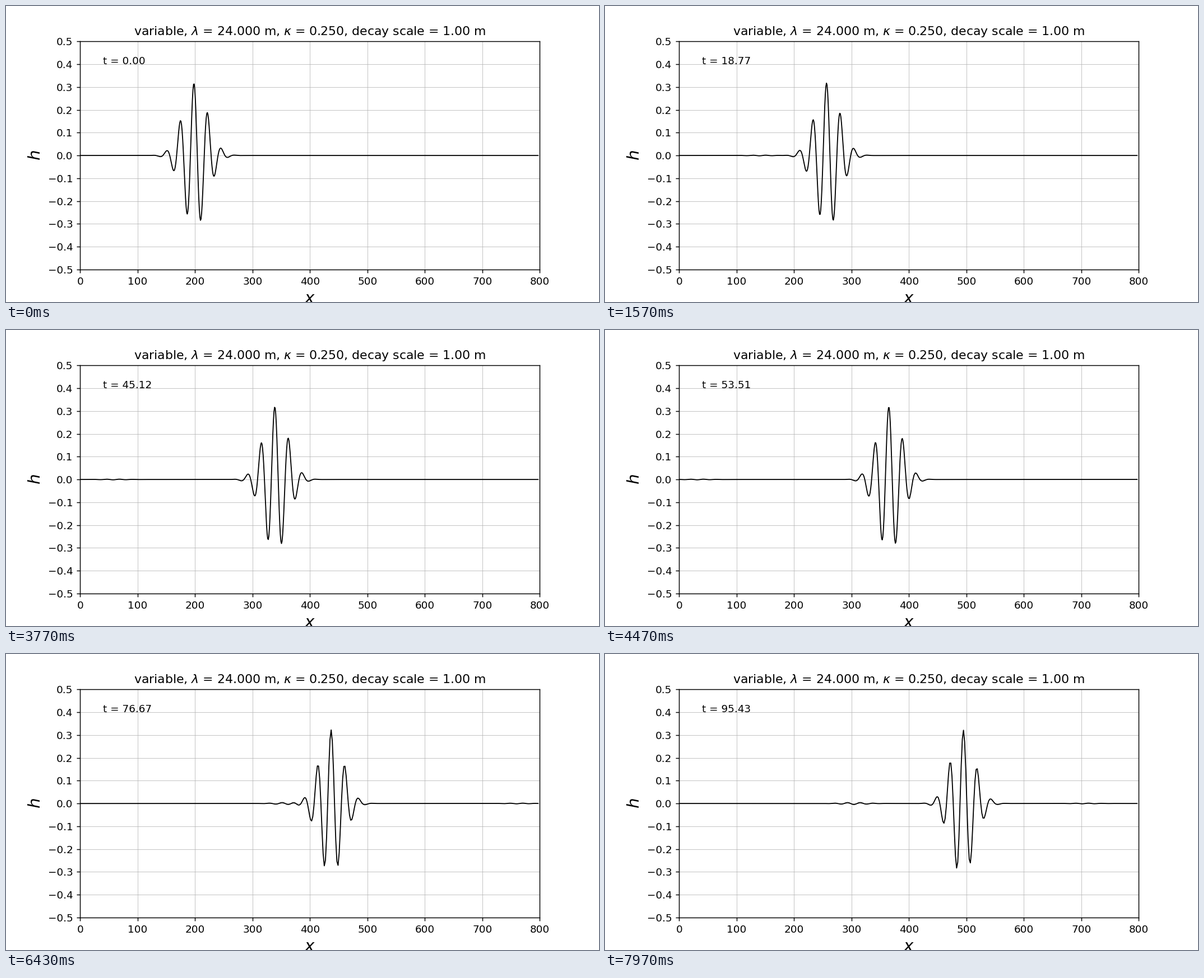
These frames come from a looping animation (1058x529 px, 8 s). A matplotlib script:

```python
import numpy as np
import matplotlib.pyplot as plt
from matplotlib.animation import FuncAnimation

FRAMES, LOOP_MS = 240, 8000
G, DEPTH, LENGTH = 9.8, 1.0, 800.0
WAVELENGTH, AMPLITUDE, WIDTH, START = 24.0, 0.32, 30.0, 200.0
SPEED = np.sqrt(G * DEPTH)
FRAME_DT = 1.25 / SPEED
SUBSTEPS = 10

# Periodic staggered mesh: fine cells on the left half, coarse on the right.
edges = np.concatenate([np.arange(0, 400, 1.0), np.arange(400, LENGTH, 2.0)])
cell = np.diff(np.append(edges, LENGTH))
centres = edges + cell / 2
spacing = (cell + np.roll(cell, 1)) / 2


def packet(x):
    envelope = np.exp(-((x - START) / WIDTH) ** 2)
    return AMPLITUDE * envelope * np.sin(2 * np.pi * x / WAVELENGTH)


def simulate():
    """Linear shallow water, kick-drift-kick; one height row per frame."""
    at_edges = packet(edges)
    h = (at_edges + np.roll(at_edges, -1)) / 2
    u = at_edges * SPEED / DEPTH
    dt = FRAME_DT / SUBSTEPS

    def kick(step):
        return -step * G * (h - np.roll(h, 1)) / spacing

    rows = [h.copy()]
    for _ in range(FRAMES - 1):
        for _ in range(SUBSTEPS):
            u = u + kick(dt / 2)
            h = h - dt * DEPTH * (np.roll(u, -1) - u) / cell
            u = u + kick(dt / 2)
        rows.append(h.copy())
    return np.array(rows)


heights = simulate()
plot_x = np.concatenate([[0.0], centres[:-1]])

plt.rcParams["font.family"] = "DejaVu Sans"
fig, ax = plt.subplots(figsize=(8, 4), dpi=132.25)
fig.subplots_adjust(left=0.125, right=0.9, bottom=0.11, top=0.88)
ax.set_xlim(0, LENGTH)
ax.set_ylim(-0.5, 0.5)
ax.set_xticks(np.arange(0, 801, 100))
ax.set_yticks(np.linspace(-0.5, 0.5, 11).round(1))
ax.grid(linewidth=0.4)
ax.set_xlabel("$x$", fontsize=16)
ax.set_ylabel("$h$", fontsize=16)
ax.set_title(r"variable, $\lambda$ = 24.000 m, $\kappa$ = 0.250, "
             "decay scale = 1.00 m", fontsize=12)

wave, = ax.plot([], [], color="black", linewidth=1)
clock = ax.text(0.05, 0.9, "", transform=ax.transAxes, fontsize=10)


def draw(i):
    h = heights[i]
    wave.set_data(plot_x, np.concatenate([h[:1], h[:-1]]))
    clock.set_text(f"t = {i * FRAME_DT:.2f}")
    return wave, clock


anim = FuncAnimation(fig, draw, frames=FRAMES, interval=LOOP_MS / FRAMES,
                     init_func=lambda: draw(0), repeat=True, repeat_delay=0)
plt.show()
```
